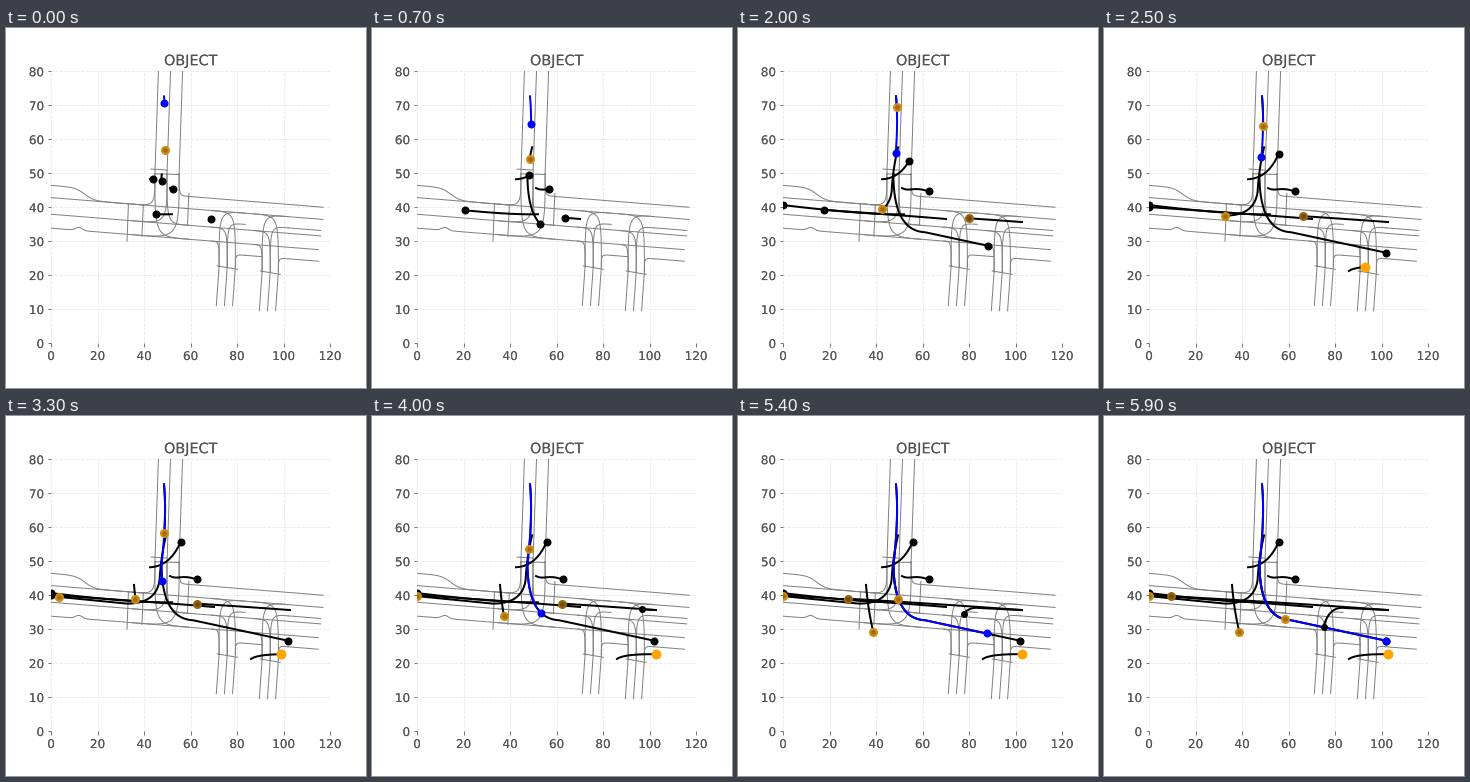
A matplotlib script for the animation above (6000 ms loop, 360 by 360 pixels).

```python
import numpy as np
import matplotlib.pyplot as plt
from matplotlib import patheffects
from matplotlib.animation import FuncAnimation

FRAMES, STEP = 60, 100
SIZE, DPI = 360, 72
INK = "#555555"
UNIT = np.array([2.325, 3.4])  # pixels per axis unit

plt.rcParams["font.family"] = "DejaVu Sans"
fig = plt.figure(figsize=(SIZE / DPI, SIZE / DPI), dpi=DPI, facecolor="white")
ax = fig.add_axes([0.125, 0.125, 0.775, 0.755])
ax.set(xticks=range(0, 121, 20), yticks=range(0, 81, 10), xlim=(0, 120), ylim=(0, 80))
title = ax.set_title("OBJECT", fontsize=14.4, color=INK, pad=6)
ax.tick_params(labelsize=12, color=INK, labelcolor=INK, length=3.5, width=0.8)
ax.grid(color="#e8e8e8", linestyle="--", linewidth=0.8)
ax.set_axisbelow(True)
ax.autoscale(False)
for spine in ax.spines.values():
    spine.set_visible(False)

# The lettering looks struck twice, slightly apart.
double = [patheffects.Normal(offset=(dx, 0)) for dx in (-0.7, 0.7)]
for text in [title, *ax.get_xticklabels(), *ax.get_yticklabels()]:
    text.set_path_effects(double)


def curve(*points, n=30):
    """Bezier curve of any degree; two points give a straight line."""
    t = np.linspace(0, 1, n)[:, None]
    points = [np.array(p) + 0 * t for p in points]
    while len(points) > 1:
        points = [a + (b - a) * t for a, b in zip(points, points[1:])]
    return points[0]


def lane(path):
    ax.plot(*path.T, color="#808080", lw=1, zorder=2)


# Streets: the main road falls gently to the east, side roads meet it.
NORTH, MIDDLE, SOUTH = 42.8, 37.9, 33.8
NORTH_CURB, EAST_SPLIT, SOUTH_CURB = 46.4, 39.5, 30.4


def along(x, offset):
    return offset - 0.055 * x


def main_lane(offset, start, end):
    lane(curve((start, along(start, offset)), (end, along(end, offset))))


def turns(edges, top, rows, end):
    """Join each edge of a side road to a row of the main road at x = end."""
    for x, row in zip(edges, rows):
        corner = (x, along(x, row))
        lane(curve((x, top), corner, corner, (end, along(end, row))))


def main_road():
    for offset, end in ((NORTH, 117), (MIDDLE, 116)):
        main_lane(offset, 0, end)
    main_lane(NORTH_CURB, 59, 117)
    main_lane(EAST_SPLIT, 102, 116)
    main_lane(SOUTH_CURB, 83.5, 91)
    main_lane(SOUTH_CURB, 102, 115)
    x = np.linspace(0, 40, 80)
    narrowing = (NORTH_CURB - NORTH) / (1 + np.exp((14.5 - x) / 2))
    lane(np.column_stack([x, along(x, NORTH_CURB - narrowing)]))
    x = np.linspace(0, 115, 200)
    bump = 0.9 * np.exp(-((x - 12) / 2) ** 2)
    lane(np.column_stack([x, along(x, SOUTH + bump)]))
    for x, top, bottom in ((33.3, NORTH, 31.8), (39.7, NORTH, 33.5), (59.3, 47.3, 38)):
        lane(curve((x, along(x, top)), (x - 0.6, along(x, bottom))))


def north_road(left=44.7, width=5.2, top=49.8):
    edges = left + width * np.arange(3)
    for x in edges:
        lane(curve((x + 1.5, 80), (x, top)))
    lane(curve((edges[0] - 1.7, top + 1.4), (edges[1], top + 1.1)))
    lane(curve((edges[0], top), (edges[2], top - 0.2)))
    turns(edges, top, (NORTH, MIDDLE, SOUTH), 35)
    turns(edges[::-1], top, (NORTH_CURB, MIDDLE, SOUTH), 59.3)


def south_road(left, top, west, east, width=3.5):
    edges = left + width * np.arange(3)
    for x in edges:
        lane(curve((x, top), (x - 1.2, top - 11.5)))
    lane(curve((edges[0] - 0.8, top + 0.2), (edges[2] + 0.8, top - 0.8)))
    turns(edges, top, (SOUTH, MIDDLE, NORTH), west)
    turns(edges[::-1], top, (SOUTH_CURB, EAST_SPLIT, NORTH), east)


main_road()
north_road()
south_road(72.3, 22.5, 69, 83.5)
south_road(90.8, 21, 87, 102)


class Actor:
    """A dot with a trail along a route; pace maps steps to the share travelled."""

    LEAD = 2  # steps of trail it already has when it shows up

    def __init__(self, route, pace, color="black", core=None, size=8, trail="black"):
        self.route = route
        lengths = np.hypot(*(np.diff(route, axis=0) * UNIT).T)
        self.share = np.concatenate([[0], np.cumsum(lengths)]) / lengths.sum()
        self.steps, self.done = list(pace), list(pace.values())
        layer = 4 if color == "blue" else 3
        self.trail, = ax.plot([], [], color=trail, lw=2, zorder=layer)
        discs = [(color, size)] + ([(core, size / 2)] if core else [])
        self.dots = [ax.plot([], [], "o", ms=s, mfc=c, mec="none", snap=False,
                             zorder=layer + 2)[0] for c, s in discs]

    def update(self, step):
        seen = step >= self.steps[0] + self.LEAD
        now = np.interp(step, self.steps, self.done)
        s = np.linspace(self.done[0], now, 80)
        x, y = (np.interp(s, self.share, axis) for axis in self.route.T)
        self.trail.set_data(x, y)
        for dot in self.dots:
            dot.set_data(x[-1:], y[-1:])
        artists = [self.trail, *self.dots]
        for artist in artists:
            artist.set_visible(seen)
        return artists


amber = dict(color="#d08a10", core="#a06a08", size=9)
brown = dict(color="#94660f", core="#6e4a08", size=9)

left_turn = np.vstack([
    curve((48.6, 72.6), (49.9, 63.2), (47.5, 48.8)),
    curve((47.5, 48.8), (47.8, 33), (61.1, 32.6)),
    curve((61.1, 32.6), (101.8, 26.6)),
])
right_turn = np.vstack([
    curve((49.5, 57.6), (47.3, 51.5), (46.7, 44.4)),
    curve((46.7, 44.4), (45.2, 37.4), (32.5, 37.5)),
    curve((32.5, 37.5), (0, 39.7)),
])
exit_south = np.vstack([
    curve((102.8, 35.6), (84.3, 36.2)),
    curve((84.3, 36.2), (77.4, 36.8), (75.1, 30.6)),
])

cars = [
    Actor(curve((52, 37.9), (36.6, 37.6), (0, 40.6)), {-2: 0, 13: 1}),
    Actor(curve((70.1, 36.5), (51.6, 37.6), (0, 40)), {-2: 0, 7: 0.095, 16: 0.494, 24: 1}),
    Actor(curve((102.8, 35.6), (55, 38), (0, 40)),
          {11: 0, 16: 0.113, 26: 0.384, 41: 0.392, 48: 0.512, 59: 0.908}, **brown),
    Actor(exit_south, {36: 0, 48: 0.57, 59: 1}, size=7),
    Actor(left_turn, {-2: 0.315, 0: 0.34, 25: 1}),
    Actor(right_turn, {-2: 0, 7: 0.07, 16: 0.277, 25: 0.54, 34: 1}, **amber),
    Actor(left_turn, {17: 0, 25: 0.12, 40: 0.262, 48: 0.317, 59: 0.585}, **amber),
    Actor(left_turn, {-2: 0, 7: 0.113, 16: 0.212, 26: 0.25, 40: 0.53, 48: 0.7, 59: 1},
          color="blue", trail="blue"),
]
walkers = [
    Actor(curve((42.6, 48.2), (51.2, 48.5), (55.7, 55.6)), {-2: 0, 25: 1}),
    Actor(curve((51.2, 45.6), (54.6, 44.4), (56.3, 46.2), (62.6, 44.6)), {-2: 0, 16: 1}),
    Actor(curve((86, 21.2), (89, 22.7), (102.6, 22.6)), {19: 0, 25: 0.43, 38: 1},
          color="orange", size=10),
    Actor(curve((35.7, 43), (36.7, 35), (38.9, 29.1)), {27: 0, 47: 1}, **amber),
]


def update(step):
    return [artist for actor in cars + walkers for artist in actor.update(step)]


anim = FuncAnimation(fig, update, frames=FRAMES, interval=STEP, repeat=True,
                     repeat_delay=0, init_func=lambda: update(0))
plt.show()
```
